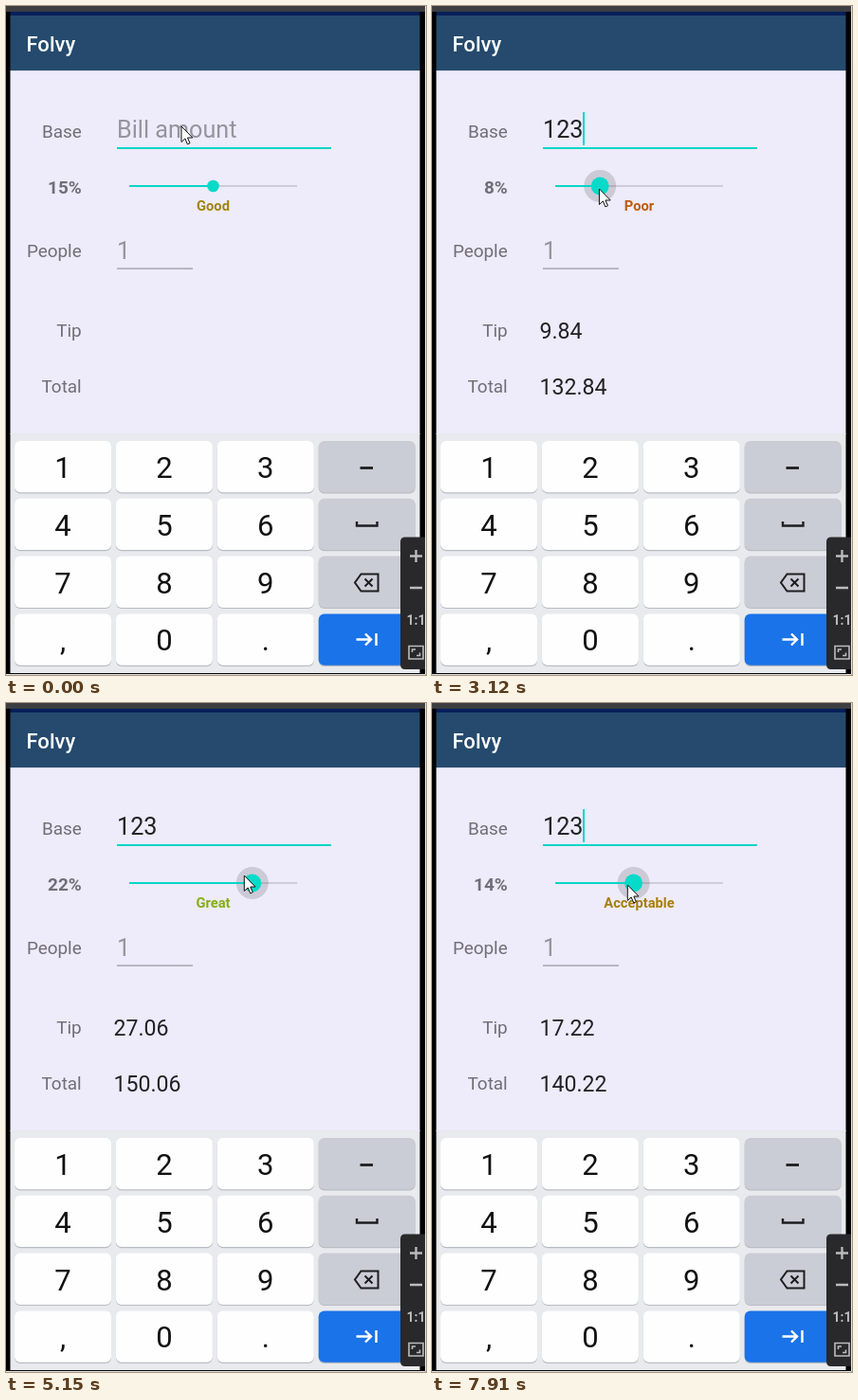
Animation of 443x706 px, one loop 8000 ms. Source, as an HTML page:

```html
<!DOCTYPE html>
<html lang="en">
<head>
<meta charset="utf-8">
<title>Tip calculator</title>
<style>
html, body { margin: 0; width: 100%; height: 100%; overflow: hidden; background: #000; }
svg { display: block; width: 443px; height: 706px; font-family: Roboto, "Noto Sans", sans-serif; }
.label { font-size: 18.9px; fill: #706e77; text-anchor: end; }
.entry { font-size: 25.2px; fill: #222225; }
.hint { fill: #96949d; }
.value { font-size: 23.1px; fill: #222225; }
.key { font-size: 31px; fill: #111; text-anchor: middle; }
.bold { font-weight: 700; }
</style>
</head>
<body>
<svg viewBox="0 0 443 706">
  <rect width="443" height="706" fill="#000"/>
  <rect width="443" height="6" fill="#3c3e41"/>
  <rect x="4.5" y="6" width="432" height="4" fill="#08205a"/>
  <rect x="4.5" y="10" width="432" height="58" fill="#254a6d"/>
  <rect x="4.5" y="68" width="432" height="384" fill="#eeebfa"/>
  <rect x="4.5" y="68" width="432" height="1" fill="#000" fill-opacity=".1"/>
  <text x="21.5" y="48" font-size="22" font-weight="500" fill="#fff">Folvy</text>

  <text class="label" x="79.700" y="139">Base</text>
  <text class="label bold" id="percent" x="79.700" y="198"></text>
  <text class="label" x="79.700" y="265">People</text>
  <text class="label" x="79.700" y="349">Tip</text>
  <text class="label" x="79.700" y="408">Total</text>

  <text class="entry" id="base" x="117" y="139"></text>
  <rect x="117" y="149" width="226" height="2" fill="#06d6c6"/>
  <rect id="caret" y="112" width="2" height="35" fill="#06d6c6"/>
  <text class="entry hint" x="117" y="267">1</text>
  <rect x="117" y="276.500" width="80" height="1.200" fill="#96949d"/>
  <text class="value" id="tip" x="113.500" y="351"></text>
  <text class="value" id="total" x="113.500" y="410"></text>

  <rect x="130" y="189" width="177" height="2" fill="#cfccd9"/>
  <circle id="halo" cy="190" fill="#000" fill-opacity=".14"/>
  <rect id="filled" x="130" y="189" height="2" fill="#06d6c6"/>
  <circle id="thumb" cy="190" fill="#06dac8"/>
  <text class="bold" id="rating" x="218.500" y="216" font-size="14.700" text-anchor="middle"></text>

  <rect x="4.500" y="451" width="432" height="253" fill="#e8eaed"/>
  <g id="keys"></g>
  <g fill="none" stroke="#1d1e20" stroke-width="2.400">
    <path d="M373.500 487.500h13.500" stroke-width="2.800"/>
    <path d="M370 544v4.500h21.500v-4.500"/>
    <path d="M374.500 599.500h18v18h-18l-6.500-9zM378.500 604.500l8 8m0-8l-8 8" stroke-width="2"/>
    <path d="M369.500 668.500h15.500m-6-6l6 6-6 6M390.500 662v13" stroke="#fff"/>
  </g>

  <path d="M443 560.500h-22q-5 0-5 5v129.500q0 5 5 5h22z" fill="#29292b"/>
  <g fill="none" stroke="#bcbcbe" stroke-width="2.300">
    <path d="M426 580.500h13m-6.500-6.500v13M426 614h13"/>
    <path d="M425 675.500h15v13.500h-15z" stroke-width="1.600"/>
    <path d="M428.500 682v-3h3.500M436.500 682.500v3h-3.500" stroke-width="1.600"/>
  </g>
  <text class="bold" x="432.500" y="653" font-size="14" text-anchor="middle" fill="#bcbcbe">1:1</text>
  <path d="M442.500 0V705.500H0" fill="none" stroke="#e4e4e6"/>

  <path id="pointer" d="M0 0V16.500L3.900 12.900 6.400 18.900 9 17.800 6.500 12H11.800Z" fill="#fff" stroke="#111" stroke-width="1"/>
</svg>
<script>
const LOOP = 8000, PRESS = 2340, FRAME = 129.5, BLINK = 490;
const BILL = '123', typedAt = [310, 460, 840], lastReset = 1260;
const ratings = ['Poor', 'Poor', 'Acceptable', 'Good', 'Great', 'Amazing', 'Amazing'];

// Pointer on its way to the slider: time, x, y
const approach = [[1045, 185, 127], [1174, 168, 161], [1304, 168, 186], [1600, 147, 231],
  [1700, 147, 231], [1951, 200, 197], [2081, 218, 197], [2340, 211, 193]];
// Turning points of the drag: time, percent, pointer x from thumb, pointer y
const drag = [[2460, 15, -7.5, 193], [3190, 7.5, 0, 193], [3894, 18, 8, 192],
  [4540, 30, 6, 188], [4800, 30, 6, 188], [5189, 22, -8.5, 182], [5837, 10, -16.5, 182],
  [6480, 1, -3, 187], [6743, 4, 1, 188], [7130, 10, -3, 190], [7760, 14, -6.3, 192]];

const $ = id => document.getElementById(id);
const set = (id, attrs) => {
  for (const name in attrs) $(id).setAttribute(name, attrs[name]);
};
const clamp = k => Math.min(1, Math.max(0, k));
const mix = (a, b, k) => a + (b - a) * k;

// Linear path through the points, held at both ends
function follow(points, t) {
  const next = points.findIndex(p => p[0] > t);
  if (next === 0) return points[0].slice(1);
  if (next < 0) return points.at(-1).slice(1);
  const a = points[next - 1], b = points[next];
  const k = (t - a[0]) / (b[0] - a[0]);
  return a.slice(1).map((v, i) => mix(v, b[i + 1], k));
}

function drawKeys() {
  let out = '';
  ['123', '456', '789', ',0.'].forEach((row, r) => {
    const y = 459 + r * 60.8;
    for (let c = 0; c < 4; c++) {
      const x = 9 + c * 106.9;
      const fill = c < 3 ? '#fefefe' : r < 3 ? '#cacdd5' : '#1a73e8';
      const box = (dy, color) =>
        `<rect x="${x}" y="${y + dy}" width="102" height="54.3" rx="6" fill="${color}"/>`;
      out += box(1.2, '#b9bcc2') + box(0, fill);
      if (c < 3) out += `<text class="key" x="${x + 51}" y="${y + 39}">${row[c]}</text>`;
    }
  });
  $('keys').innerHTML = out;
}

function drawBill(text, percent) {
  const bill = Number(text), tip = bill * percent / 100;
  $('base').textContent = text || 'Bill amount';
  $('base').classList.toggle('hint', !text);
  $('tip').textContent = text && tip.toFixed(2);
  $('total').textContent = text && (bill + tip).toFixed(2);
}

function drawSlider(percent, thumbX, grow) {
  const k = percent / 30;
  const rgb = [mix(221, 100, k), mix(44, 221, k), mix(0, 23, k)].map(Math.round);
  $('percent').textContent = percent + '%';
  $('rating').textContent = ratings[Math.floor(percent / 5)];
  set('rating', { fill: `rgb(${rgb})` });
  set('filled', { width: thumbX - 130 });
  set('thumb', { cx: thumbX, r: 6.3 + 3.1 * grow ** 2 });
  set('halo', { cx: thumbX, r: 17 * (1 - (1 - grow) ** 3) });
}

function draw(time) {
  // The screen refreshes in steps
  const t = PRESS + Math.round((time - PRESS) / FRAME) * FRAME;
  const text = BILL.slice(0, typedAt.filter(at => at <= time).length);
  const [value, gripX, gripY] = follow(drag, t);
  const percent = Math.round(value);
  const thumbX = 130 + percent * 5.9;

  drawBill(text, percent);
  drawSlider(percent, thumbX, clamp((t - PRESS) / (2 * FRAME)));

  const caretOn = text && (t < lastReset || Math.floor((t - lastReset) / BLINK) % 2);
  set('caret', { x: Math.round(117 + text.length * 14.1), opacity: caretOn ? 1 : 0 });

  const [x, y] = t < PRESS ? follow(approach, t) : [thumbX + gripX, gripY];
  set('pointer', { transform: `translate(${x} ${y})` });
}

drawKeys();
const start = performance.now();
function tick() {
  draw((performance.now() - start) % LOOP);
  requestAnimationFrame(tick);
}
tick();
</script>
</body>
</html>
```
